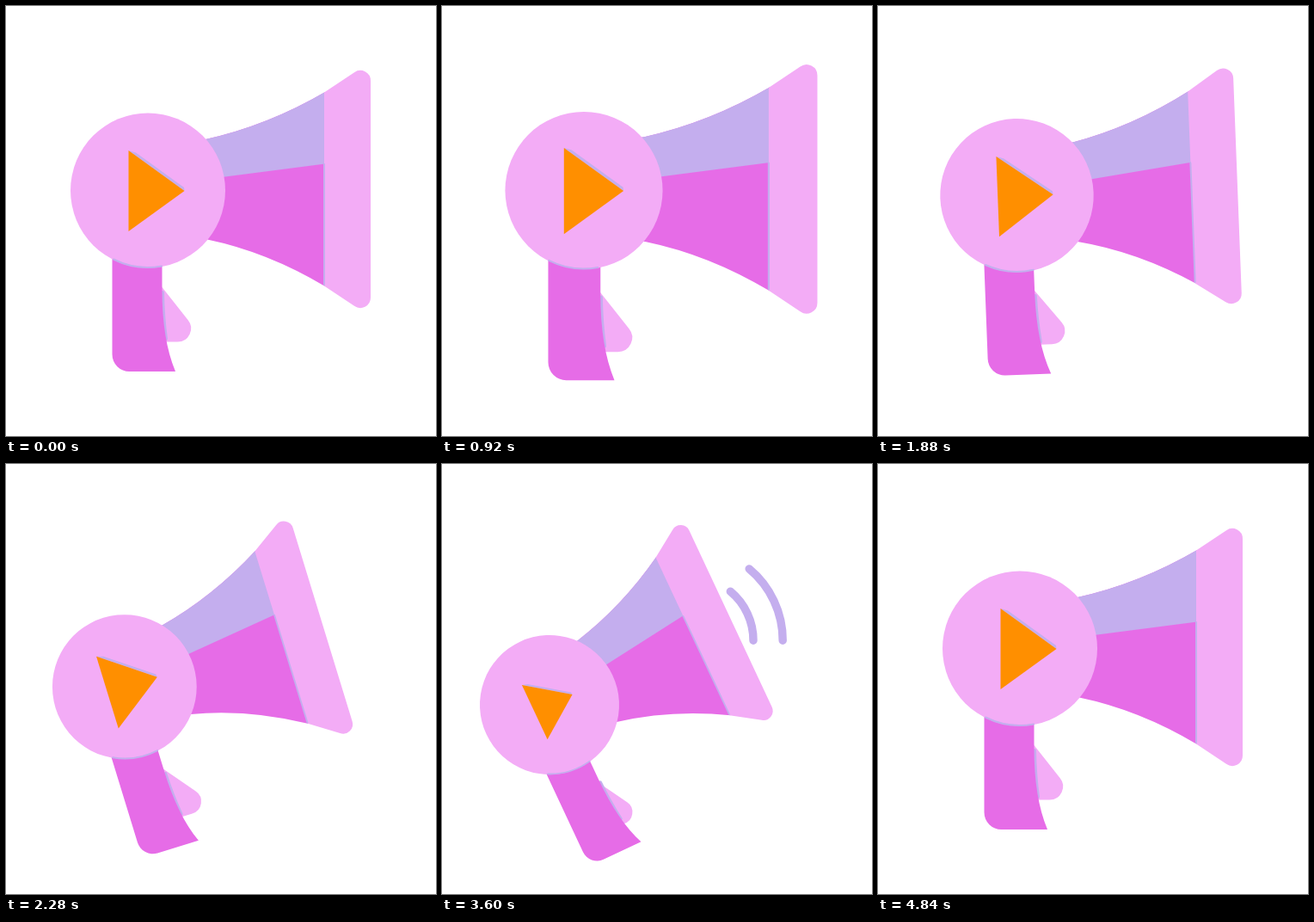
These frames come from a looping animation (500 px wide and 500 px high, 5000 ms). An HTML page:

```html
<!DOCTYPE html>
<html lang="en">
<head>
<meta charset="utf-8">
<title>Megaphone</title>
<style>
  html, body { margin: 0; width: 100%; height: 100%; overflow: hidden; background: #fff; }
  svg { display: block; width: 100%; height: 100%; }
  .pink { fill: #f3acf6; }
  .magenta { fill: #e66ce7; }
  .lilac { fill: #c4aeee; }
  .orange { fill: #ff8f00; }
  .line { fill: none; stroke: #c4aeee; stroke-linecap: round; }
</style>
</head>
<body>
<svg viewBox="0 0 500 500">
  <g id="all">
    <g id="waves"></g>
    <g id="horn">
      <path class="magenta" d="M200 160 L232 155 Q304 139 371 100 V326 Q304 286 234 271.5 L200 266Z"/>
      <path class="lilac" d="M200 160 L232 155 Q304 139 371 100 V183.5 L255 198.5 L200 206Z"/>
      <path class="pink" d="M370 100.5 L405 77.2 A12 12 0 0 1 424 87 V339 A12 12 0 0 1 405 348.8 L370 325.5Z"/>
      <path class="line" stroke-width="2" d="M370 184 V324"/>
    </g>
    <g id="grip">
      <g id="trigger">
        <path class="pink" d="M172 315 L211.7 365.3 A15.5 15.5 0 0 1 199.5 390.5 H172Z"/>
      </g>
      <path class="line" stroke-width="4" d="M182 333 Q182.5 362 186 387"/>
      <path class="magenta" d="M123.5 270 V405 A20 20 0 0 0 143.5 425 H197 Q181.5 388 181.5 330 V270Z"/>
    </g>
    <g id="disc">
      <circle class="pink" cx="165" cy="214.5" r="90"/>
      <path class="line" stroke-width="2" d="M125 294.5 A89 89 0 0 0 181 302.5"/>
      <g id="play">
        <path class="lilac" d="M142.5 168 L151 170.5 L207 211 L207.5 215Z"/>
        <path class="orange" d="M142.5 168 L207.5 215 L142.5 262Z"/>
      </g>
    </g>
  </g>
</svg>
<script>
const LOOP = 5000, STEP = 40;
const PUFF = { first: 2320, gap: 560, count: 3, life: 600 };
const CX = 165, CY = 214.5;

const el = id => document.getElementById(id);
const clamp = x => Math.min(1, Math.max(0, x));
const ease = x => 0.5 - 0.5 * Math.cos(Math.PI * clamp(x));
const span = (t, a, b) => ease((t - a) / (b - a));
const put = (id, value) => el(id).setAttribute('transform', value);
const zoom = (s, x, y) => `translate(${x} ${y}) scale(${s}) translate(${-x} ${-y})`;

// swell, dip, settle
function pulse(t, [start, high, low, end]) {
  return 1 + 0.1 * span(t, start, high) - 0.15 * span(t, high, low) + 0.05 * span(t, low, end);
}

// one trigger squeeze per puff of sound
function squeeze(t) {
  const n = Math.floor((t - PUFF.first) / PUFF.gap);
  if (n < 0 || n >= PUFF.count) return 0;
  const u = clamp((t - PUFF.first - n * PUFF.gap) / 420);
  return Math.sin(Math.PI * u) ** 2;
}

const arcs = [];
for (let i = 0; i < PUFF.count * 2; i++) {
  const path = document.createElementNS('http://www.w3.org/2000/svg', 'path');
  path.setAttribute('class', 'line');
  path.setAttribute('stroke-width', 10.5);
  el('waves').append(path);
  arcs.push(path);
}

function drawWaves(t) {
  arcs.forEach((path, i) => {
    const age = t - PUFF.first - Math.floor(i / 2) * PUFF.gap;
    const u = clamp(age / 520);
    const r = 56 + 123 * (1 - (1 - u) ** 2) - (i % 2) * 38;
    const shown = age > 0 && age < PUFF.life && r > 40;
    path.style.display = shown ? '' : 'none';
    if (!shown) return;
    const x = 364.5 + r * Math.cos(0.44), dy = r * Math.sin(0.44);
    path.setAttribute('d', `M${x} ${216 - dy} A${r} ${r} 0 0 1 ${x} ${216 + dy}`);
  });
}

function draw(t) {
  const early = pulse(t, [0, 510, 1280, 1660]);
  const late = pulse(t, [60, 600, 1400, 1800]);
  const tilt = span(t, 1700, 2640) - span(t, 3720, 4800);
  const press = squeeze(t);

  put('all', `translate(${CX - 40 * tilt} ${CY + 65.5 * tilt}) rotate(${-25.1 * tilt}) ` +
    `scale(${1 - 0.1 * tilt}) translate(${-CX} ${-CY})`);
  put('horn', zoom(late, CX, CY));
  put('grip', zoom(late, 124, CY));
  put('trigger', zoom(early, 124, CY) + ` rotate(${9 * press} 165 300)`);
  put('disc', zoom(early, CX, CY));
  put('play', zoom(late * (1 - 0.2 * press), 149, 215));
  drawWaves(t);
}

const begin = performance.now();
function tick() {
  const t = (performance.now() - begin) % LOOP;
  draw(Math.floor(t / STEP) * STEP);
  requestAnimationFrame(tick);
}
tick();
</script>
</body>
</html>
```
